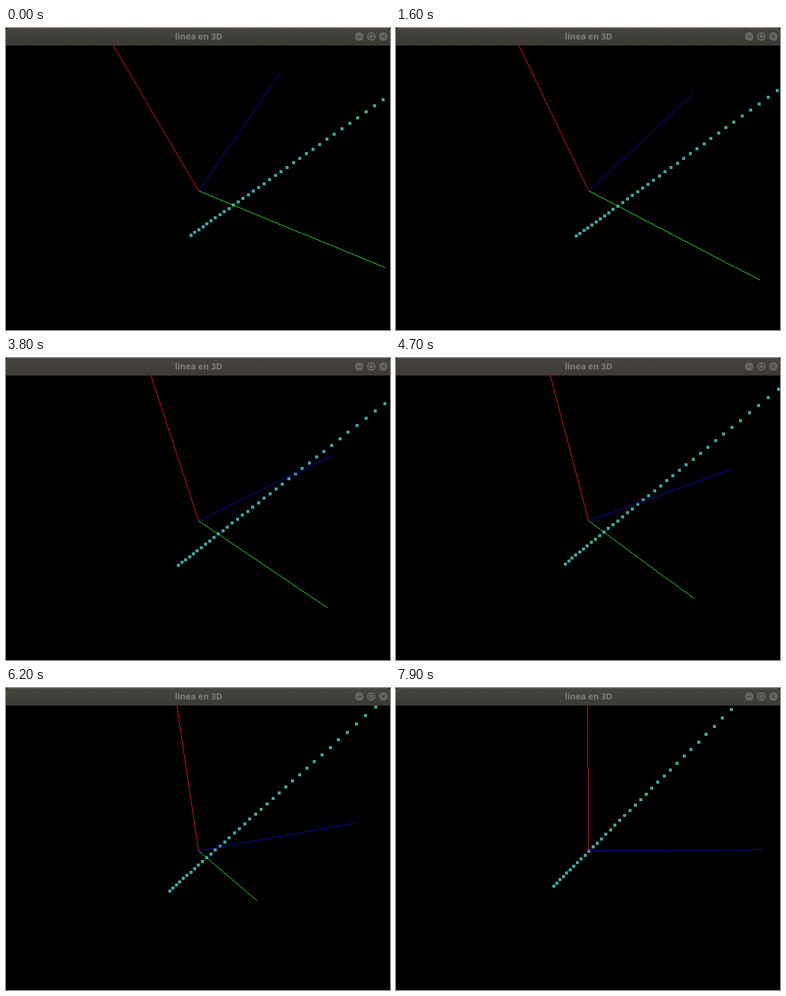
Animation, 636 px wide and 499 px high, one loop 8000 ms. Source, as an HTML page with a canvas:

```html
<!DOCTYPE html>
<html lang="es">
<head>
<meta charset="utf-8">
<title>linea en 3D</title>
<style>
  html, body { margin: 0; width: 100%; height: 100%; overflow: hidden; background: #000; }
  canvas { display: block; }
</style>
</head>
<body>
<canvas id="stage" width="636" height="499"></canvas>
<script>
const ctx = document.getElementById('stage').getContext('2d');
const ORIGIN = { x: 319, y: 269 };
const AXIS = 289.7;              // on-screen axis length at depth 0
const STEP = 100, FRAMES = 80;
const POINTS = 51;

// Rotation about (1,1,1), then perspective from two axis lengths away
function projector(degrees) {
  const angle = degrees * Math.PI / 180;
  const c = (1 - Math.cos(angle)) / 3;
  const s = Math.sin(angle) / Math.sqrt(3);
  const a = 1 - 2 * c, b = c + s, d = c - s;
  return (x, y, z) => {
    const scale = AXIS / (1 - (d * x + b * y + a * z) / 2);
    return [
      ORIGIN.x + (a * x + d * y + b * z) * scale,
      ORIGIN.y - (b * x + a * y + d * z) * scale
    ];
  };
}

// One-pixel line without smoothing
function drawLine([x, y], color) {
  const dx = x - ORIGIN.x, dy = y - ORIGIN.y;
  const count = Math.max(1, Math.floor(Math.max(Math.abs(dx), Math.abs(dy))));
  ctx.fillStyle = color;
  for (let i = 0; i < count; i++) {
    const k = (i + 0.5) / count;
    ctx.fillRect(Math.floor(ORIGIN.x + dx * k), Math.floor(ORIGIN.y + dy * k), 1, 1);
  }
}

function drawScene(frame) {
  const project = projector(71.75 - 0.899 * frame);
  ctx.fillStyle = '#000';
  ctx.fillRect(0, 0, 636, 499);

  ctx.fillStyle = '#3ca4a4';
  for (let i = 0; i < POINTS; i++) {
    const side = -0.2 + 0.02 * i;
    const [x, y] = project(side, side, 0.024 * i);
    ctx.fillRect(Math.floor(x) - 2, Math.floor(y) - 2, 5, 5);
  }

  drawLine(project(0, 1, 0), '#e61c1c');
  drawLine(project(0, 0, 1), '#20ec20');
  drawLine(project(1, 0, 0), '#0808be');
}

function drawButton(x, glyph) {
  ctx.beginPath();
  ctx.arc(x, 14, 8, 0, 2 * Math.PI);
  ctx.fillStyle = '#66645e';
  ctx.fill();
  ctx.strokeStyle = '#31302c';
  ctx.lineWidth = 1;
  ctx.stroke();
  ctx.beginPath();
  glyph(x);
  ctx.stroke();
}

function drawTitleBar() {
  const shade = ctx.createLinearGradient(0, 0, 0, 29);
  shade.addColorStop(0, '#464540');
  shade.addColorStop(1, '#3a3934');
  ctx.fillStyle = '#000';
  ctx.fillRect(0, 0, 636, 29);
  ctx.fillStyle = shade;
  ctx.beginPath();
  ctx.roundRect(0, 0, 636, 29, [4, 4, 0, 0]);
  ctx.fill();
  ctx.fillStyle = '#54534d';
  ctx.fillRect(4, 0, 628, 1);

  ctx.font = 'bold 14.2px "Open Sans", "Noto Sans", sans-serif';
  ctx.textAlign = 'center';
  ctx.fillStyle = '#817e77';
  ctx.fillText('linea en 3D', 319, 19);

  drawButton(585, x => { ctx.moveTo(x - 4, 14.5); ctx.lineTo(x + 4, 14.5); });
  drawButton(605, x => ctx.rect(x - 3.5, 10.5, 7, 7));
  drawButton(625, x => {
    ctx.moveTo(x - 3, 11); ctx.lineTo(x + 3, 17);
    ctx.moveTo(x + 3, 11); ctx.lineTo(x - 3, 17);
  });
}

function render() {
  drawScene(Math.floor(performance.now() / STEP) % FRAMES);
  drawTitleBar();
  requestAnimationFrame(render);
}
render();
</script>
</body>
</html>
```
